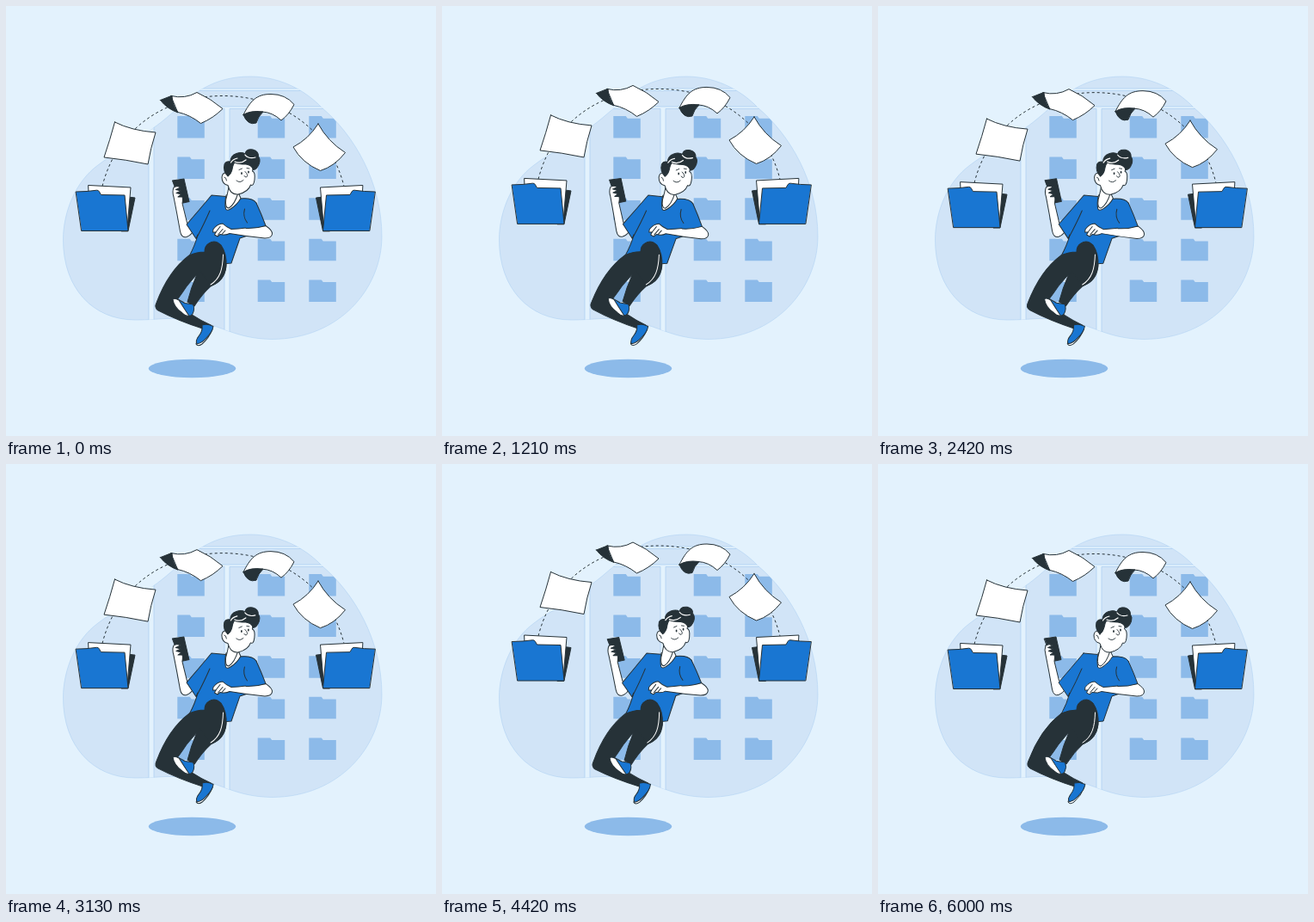
Write an HTML page that moves like this. It is 500 px wide and 500 px high and loops after 6040 ms.

```html
<!DOCTYPE html>
<html lang="en">
<head>
<meta charset="utf-8">
<title>Floating files</title>
<style>
  html, body { margin: 0; width: 100%; height: 100%; overflow: hidden; background: #e3f2fd; }
  svg { display: block; width: 100vw; height: 100vh; }
  .blue, .white, .dark, .line { stroke: #263238; stroke-linejoin: round; stroke-linecap: round; }
  .blue { fill: #1976d2; }
  .white { fill: #fff; }
  .dark { fill: #263238; }
  .line { fill: none; }
  .shine { fill: none; stroke: #fff; stroke-linecap: round; }
  .gap { fill: #e3f2fd; stroke: #a9cdf1; stroke-width: .7; }
</style>
</head>
<body>
<svg viewBox="0 0 500 500">
  <defs>
    <path id="blob" d="M66.500 272C66.500 238 82 203 107 185C127 169 152 161 171 142C184 133 192 125 201 118C218 102 241 82 284 82C323 82 352 102 367 118C405 150 437 205 437 268C437 328 388 387.500 309 387.500C279 387 262 379 245 373C226 366 205 363 186 363.500C174 364 167 365 150 365C101 365 66.500 328 66.500 272Z"/>
    <clipPath id="room"><use href="#blob"/></clipPath>
    <path id="icon" d="M0 0H14.500L16.500 2.700H31.500V25.500H0Z" fill="#8cbae9"/>
    <g id="folder">
      <path class="dark" d="M142 261L150 222.500L138 221L134 261Z"/>
      <path class="white" d="M96 208L145 210.500L141.500 252L98 250Z"/>
      <path class="blue" d="M81.500 215.500L94 215L105.500 213.700Q107.500 213.500 108.500 215.500L110.500 219L138 219.500L142 261H88Z"/>
    </g>
  </defs>

  <use href="#blob" fill="#d1e4f7" stroke="#a9cdf1" stroke-width=".5"/>
  <g clip-path="url(#room)" id="wall">
    <rect class="gap" x="60" y="96" width="380" height="2.500"/>
    <path class="gap" d="M166 380V117H440V119.500H260V400H254V119.500H172V380Z"/>
  </g>
  <ellipse cx="216.500" cy="421.500" rx="50.700" ry="10.700" fill="#8cbae9"/>

  <g id="files">
    <path class="line" stroke-dasharray="3 3" style="stroke-linecap:butt" d="M112 209C130 138 190 104 252 104S375 138 393 209"/>
    <use href="#folder"/>
    <use href="#folder" transform="translate(510.500) scale(-1 1)"/>
    <path class="white" d="M126.500 134.500Q146 144.500 174 146.500Q168 165 165 183.500Q139 178 114 175.500Q121 155 126.500 134.500Z"/>
    <path class="white" d="M192 104Q208 108 222 100Q238 107 252 119Q241 130 226.500 136Q214 126 200 123Z"/>
    <path class="dark" d="M179.500 109L193 103.700Q193 114 200 123.500Q187 119 179.500 109Z"/>
    <path class="white" d="M276 126C284 110 291 102 308 102Q325 102 335 114Q329 126 320 132.500Q310 123 298 122.500Z"/>
    <path class="dark" d="M276 126Q284 120.500 299 122.500Q293 128 291 135.500Q281 139 276 126Z"/>
    <path class="white" d="M363 136.500Q374 157 394.500 170Q382 186 365.500 191Q344 182 334 163.500Q352 154 363 136.500Z"/>
  </g>

  <g id="man">
    <!-- phone arm -->
    <path class="dark" d="M193.500 203L207 201L213 227.500L203.500 229.500Z"/>
    <path class="white" d="M195 211Q193 216 195 222Q199 242 202.500 262Q204 270 210 268.500Q215 267 219 260L210.500 252L205 229.500Q206 224 205 222L200 222L204 219L198 217.500L203.500 215L197.500 213.500L203 211Q199 208.500 195 211Z"/>

    <!-- far leg -->
    <path class="dark" d="M232 282Q242 268 253 283C259 298 257 318 238 326Q228 335 219 349L211 344Q215 328 222 312Z"/>
    <!-- shirt -->
    <path class="blue" d="M239 220Q255 221 273 224Q286 224 291 229L296 262L272 270L262 299L240 301L213 291Q220 278 223 266L221 270.500L210 254Q224 238 239 220Z"/>
    <path class="line" d="M237 238Q231 252 222 269"/>
    <!-- near leg -->
    <path class="dark" d="M213 290Q222 286 231 286Q231 279 236 276Q243 271 250 278Q257 288 256 303Q254 320 239 325Q232 318 226 308Q217 317 210 326Q202 338 197 344Q216 361 238 371L230 375.500Q200 366 177 354Q172 351 175 345Q189 308 213 290Z"/>
    <path class="shine" d="M252.500 289C252 306 249 317 238 324"/>

    <!-- shoes -->
    <path class="blue" d="M208 345.500L217.500 347Q220 352 217 358Q214 362 209 359.500Q199 352 194 342Q194 339 199 340.500Z"/>
    <path class="white" d="M194 341Q196 339 201 342Q206 350 213 360.500Q209 361 205 357Q195 350 194 341Z"/>
    <path class="white" d="M240 376Q236 386 228 393Q223 396.500 221 393L223 386Z"/>
    <path class="blue" d="M228 371Q234 369 241 372.500Q240 379 233 386Q228 392 222 393Q220 389 224 384Q229 378 228 371Z"/>

    <!-- resting arm -->
    <path class="white" d="M279 258L302 255.500Q310 261 309.500 265Q309 270 301 270Q280 268 260 264.500Q256 267 249 265.500L246 268L242.500 266L244 263L240.500 263L241 259.500Q246 253 252 253Q256 257 262 259.500Q270 259 279 258Z"/>
    <path class="line" d="M244 263L249 256.500M246.500 266L252 259.500M251 265.500L255 261"/>
    <path class="blue" style="stroke:none" d="M273 224Q287 223 291 229Q297 242 302 255.500Q291 259 279 258.500Z"/>
    <path class="line" d="M273 224Q287 223 291 229Q297 242 302 255.500Q291 259 279 258.500M280.500 252Q275 245 277.500 236"/>

    <!-- head and neck -->
    <path class="white" d="M256 220Q254 229 255.500 236Q257 238.500 261 236Q269 231 273 223.500L270 217Z"/>
    <path class="white" d="M260 205Q258 217 255.700 225Q254.500 235 259 235Q266 231 270 217Z"/>
    <path class="white" d="M262 181Q260 189 258 195Q252 192 251 199Q251 207 258 208.500Q261 220 270 219Q282 216 284.500 208Q288 210 289 202Q290 193 286.500 192L289 181Q276 170 262 181Z"/>
    <path class="dark" d="M258 198Q252 192 254 184Q256 180 261 181Q261 174 268 171.500Q274 169.500 278 172Q279 166 287 167Q294 169 293.500 175Q296 178 294.500 183Q292 190 287.500 190.500Q286 185 279 184Q270 184 266 182Q264 184 263 190Q262 195 258 198Z"/>
    <path class="shine" stroke-width="1.200" d="M261.500 182Q264 178 269 177M266 181Q273 184 279 179M278 173Q282 178 290 176"/>
    <path class="line" d="M278 192.500Q282.500 197 279.500 199Q277.500 199 277 197.500M268 203Q272 206.500 276 202.500M271 190.500L274.500 189M280 188.500L283 189M254 199Q256 199 256.500 203" stroke-width=".9"/>
    <ellipse cx="274" cy="194.500" rx=".9" ry="1.500" fill="#263238"/>
    <ellipse cx="282" cy="193" rx=".9" ry="1.500" fill="#263238"/>
  </g>
</svg>
<script>
  const files = document.getElementById('files');
  const man = document.getElementById('man');

  let icons = '';
  for (const x of [199.300, 292.700, 352.300])
    for (let row = 0; row < 5; row++)
      icons += `<use href="#icon" x="${x}" y="${128 + row * 47.600}"/>`;
  document.getElementById('wall').insertAdjacentHTML('beforeend', icons);

  const LOOP = 6040;
  // Triangle wave: 0 at the start, 1 halfway, 0 at the end of each period.
  const triangle = (t, period) => 1 - Math.abs(2 * (t / period % 1) - 1);

  function draw() {
    const t = Math.min(performance.now() % LOOP, 6000);
    const lift = 0.5 - 10 * triangle(t, 3000);
    const tilt = 2 * triangle(t + 1500, 6000) - 1;
    files.setAttribute('transform', `translate(0 ${lift})`);
    man.setAttribute('transform', `rotate(${tilt} 241.500 280.500)`);
    requestAnimationFrame(draw);
  }
  draw();
</script>
</body>
</html>
```
